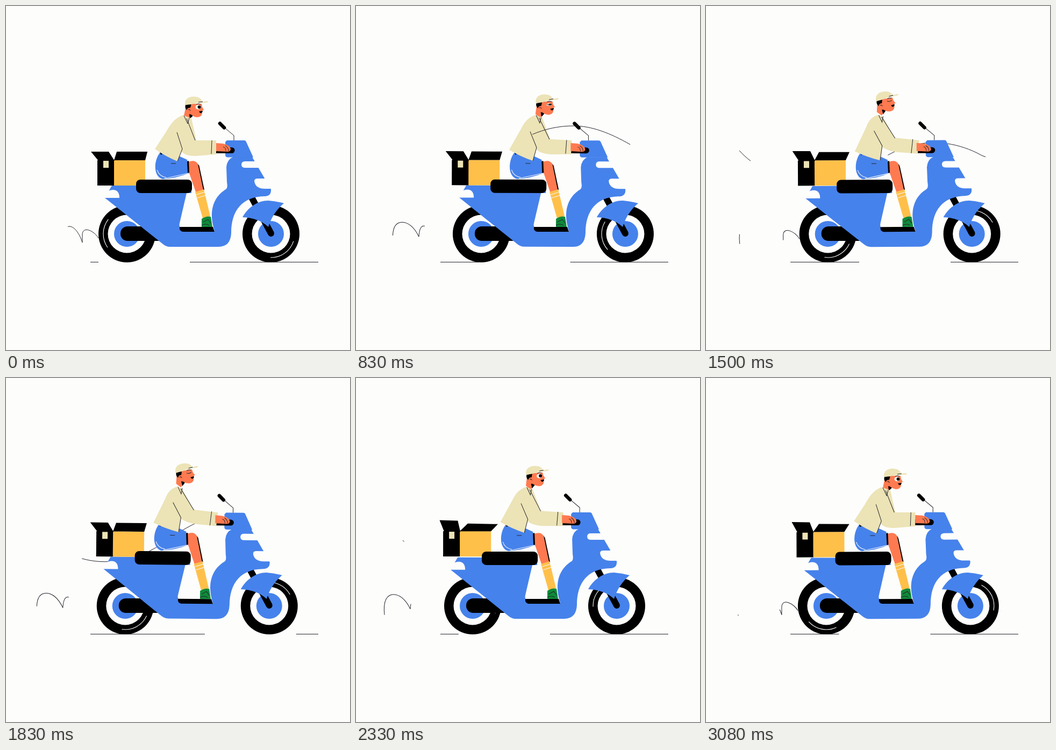
An HTML page that plays this animation: 640x640 px, repeating every 3160 ms.

```html
<!DOCTYPE html>
<html lang="en">
<head>
<meta charset="utf-8">
<title>Scooter ride</title>
<style>
  html, body { margin: 0; width: 100%; height: 100%; overflow: hidden; background: #fdfdfc; }
  svg { display: block; width: 100vw; height: 100vh; }
  .blue { fill: #4682eb; }
  .paper { fill: #fdfdfc; }
  .cream { fill: #ece3b6; }
  .skin { fill: #ff7a50; }
  .sun { fill: #ffc04a; }
  .thin { fill: none; stroke: #26262c; stroke-width: 1; }
  .light { fill: none; stroke: #eef2fa; stroke-width: 1.1; }
  .bar { fill: none; stroke: #000; stroke-linecap: round; }
  .shine { fill: none; stroke: #fff; stroke-width: 1.1; stroke-dasharray: 56 300; }
</style>
</head>
<body>
<svg viewBox="0 0 640 640">
  <path id="ground" class="thin" d="M157 476.5H581" stroke-dasharray="254 170"/>
  <path id="smoke" class="thin" pathLength="1" d="M172 432C165 419 143 408 142 425L142 440C138 426 128 410 118 410Q110 410 109 430C100 411 88 403 78 403C66 403 58 414 61 441"/>
  <path id="windBack" class="thin" pathLength="1" d="M580 318C555 298 535 286 513 278C470 254 425 250 390 258C330 270 300 310 250 330C200 348 130 350 87 302"/>

  <g id="wheels">
    <g transform="translate(225 424)">
      <circle r="53"/><circle r="35.5" class="paper"/><circle r="24" class="blue"/>
      <circle id="rearShine" r="44" class="shine"/>
      <rect x="-12" y="-14" width="84" height="27" rx="13"/>
    </g>
    <g transform="translate(493 424)">
      <circle r="53"/><circle r="35.5" class="paper"/><circle r="24" class="blue"/>
      <circle id="frontShine" r="44" class="shine"/>
    </g>
    <path class="bar" stroke-width="12" d="M458 358L493 423"/>
    <path class="blue" d="M440 393C450 375 468 362 488 362Q502 363 517 367C503 379 494 393 488 411C475 399 460 394 440 393Z"/>
  </g>

  <g id="bike">
    <path class="blue" d="M184 357L197 334H345V348H336L323 404Q321 412 328 415L388 419Q382 400 383 385C385 360 398 348 409 341Q413 338 411 328L410 300Q411 286 422 281H458L493 341Q494 354 480 354C440 355 419 380 419 422Q418 448 395 448H305Q298 448 292 443Z"/>
    <path d="M323 411H385L388 420H329Q322 419 323 411Z"/>
    <path class="paper" d="M183 357Q185 342 200 342Q211 343 211 357Z"/>
    <path class="paper" d="M445 289H463L471 301H445Q438 301 438 295Q438 289 445 289ZM468 321H483L495 340H482Q464 340 462 326Q462 321 468 321Z"/>

    <path class="thin" d="M424 250V241L405 225"/>
    <path class="bar" stroke-width="6.5" d="M398 218.500L406 226.500"/>
    <path class="blue" d="M411 250H443Q446 250 447 253L460 281.500H412Q408 281 408 277V253Z"/>
    <path class="bar" stroke-width="11" d="M388 268.500H420"/>

    <g id="box">
      <path d="M170 287H202V334H170Z"/>
      <path class="sun" d="M201 287H259V334H201Z"/>
      <path class="cream" d="M181 288H191V301H181Z"/>
      <path id="flaps"/>
    </g>

    <!-- legs -->
    <path d="M350 292Q359 292 360 300L369 342L362 344Z"/>
    <path class="skin" d="M339 290Q352 285 357 294L367 342L353 346L341 311Z"/>
    <path class="sun" d="M352 346L368 341L380 391L366 395Z"/>
    <path class="light" d="M354 351L370 346M356 357L372 352"/>
    <path fill="#0f8a3a" d="M364 396Q373 390 381 392L384 411H364Z"/>
    <path class="thin" d="M367 402L376 397L381 404M364 408Q372 404 378 408"/>
    <path class="blue" d="M287 272C274 288 274 317 291 322Q315 321 341 311L337 286L315 276Z"/>
    <path d="M337 289L340 288L341 310L338 311Z"/>
    <path class="light" d="M281 305Q285 317 298 319M295 321L340 311"/>
    <path class="thin" d="M307 293H316"/>
    <path d="M286 270L293 274L288 277Z"/>
    <rect x="242" y="323" width="104" height="25" rx="8"/>

    <!-- rider -->
    <g id="head">
      <path class="skin" d="M334 190L331 204L339 212L347 203V194Z"/>
      <path d="M341 201L349 203L342 210Z"/>
      <path class="skin" d="M341 182H364L365 188L368 193L365 195Q366 207 355 207Q343 205 341 195Z"/>
      <path d="M334 184Q332 190 337 194L343 189L345 182Z"/>
      <circle class="skin" cx="341" cy="194" r="4.5"/>
      <path class="thin" d="M339 193Q342 191 343 195M354 183Q358 181 362 183"/>
      <g id="eye">
        <ellipse cx="357.5" cy="188" rx="5" ry="4.2" fill="#fff"/>
        <circle cx="359.5" cy="188" r="3"/>
      </g>
      <path id="lid" class="thin" d="M353 187Q357 190 362 187"/>
      <path d="M359 196L366 195Q365 200 361 199Z"/>
      <path class="cream" d="M333 184Q332 169 349 168.500Q363 169 365 178L375 177Q377 179 373 180Q352 180 345 183Z"/>
      <path class="thin" d="M358 179L366 178"/>
    </g>
    <path id="shirt" class="cream"/>
    <path id="folds" class="thin"/>
    <path class="skin" d="M391 255L404 256Q417 259 418 266Q418 271 412 271L391 270Z"/>
    <path class="thin" d="M404 262Q409 263 409 270M408 260Q414 263 414 270"/>
  </g>
  <path id="windFront" class="thin" pathLength="1" d="M589 310C520 260 460 223 405 223C310 223 260 290 200 310C140 325 95 305 62 269"/>
</svg>
<script>
const LOOP = 3160, STEPS = 38, BEATS = 90;
const $ = id => document.getElementById(id);
const set = (id, name, value) => $(id).setAttribute(name, value);
const clamp = x => Math.min(1, Math.max(0, x));
const wave = (cycles, beat, peak) => Math.cos(2 * Math.PI * (cycles * beat / BEATS - peak));

// Piecewise linear curve through [x, y] points.
function curve(x, points) {
  for (let i = 1; i < points.length; i++) {
    const [x0, y0] = points[i - 1], [x1, y1] = points[i];
    if (x <= x1) return y0 + (y1 - y0) * clamp((x - x0) / (x1 - x0));
  }
  return points[points.length - 1][1];
}

// Blend two paths that share the same commands.
function blend(a, b, u) {
  const ends = b.match(/[\d.]+/g);
  let i = 0;
  return a.replace(/[\d.]+/g, n => (+n + (ends[i++] - n) * u).toFixed(2));
}

function trim(id, tail, head) {
  const from = clamp(tail), length = Math.max(0, clamp(head) - from);
  set(id, 'stroke-dasharray', `0 ${from} ${length} 3`);
  set(id, 'visibility', length > 0 ? 'visible' : 'hidden');
}

// Picture steps to whole beats; every motion below runs on beats.
const TEMPO = [[0, 0], [4, 7], [10, 21], [18, 42], [22, 51], [28, 67], [37, 88], [38, 90]];
const BLINK = [[18, 1], [24, 0], [56, 0], [62, 1]];

const SHIRT = [
  'M329 203C312 209 304 224 298 234L277 266Q297 280 319 289L326 270Q333 279 352 279L391 276L391 250L354 250L345 209Z',
  'M320 202C305 207 301 216 298 224L276 270Q299 281 323 287L327 262Q338 270 357 272L393 275L396 250L350 245L329 207Z'];
const FOLDS = [
  'M331 204L338 219L341 208M336 209L352 250M318 235L328 266L319 289M383 250L382 275',
  'M321 203L327 216L329 205M326 206L351 246M312 232L327 260L323 287M384 248L381 274'];
const FLAPS = [
  'M158 271L191 271L202 288L172 288ZM206 271L263 271L259 287L201 287Z',
  'M164 266L198 267L202 288L172 288ZM217 273L273 274L259 287L201 287Z'];

function draw(beat) {
  const dx = 8 * wave(1, beat, .25), tilt = .76 * wave(2, beat, .25);
  const ride = `translate(${dx} 0) rotate(${tilt} 360 430)`;
  set('bike', 'transform', ride);
  set('smoke', 'transform', ride);
  set('wheels', 'transform', `translate(${dx} 0)`);

  // Eight ground lengths and ten wheel turns per loop.
  set('ground', 'stroke-dashoffset', beat * 8 * 424 / BEATS - 185);
  const turn = beat * 3600 / BEATS;
  set('rearShine', 'transform', `rotate(${turn + 145})`);
  set('frontShine', 'transform', `rotate(${turn + 18})`);

  const hop = .6 * (1 + wave(9, beat, .53));
  set('box', 'transform', `translate(0 ${-2 * hop})`);
  set('flaps', 'd', blend(...FLAPS, hop));

  // The rider sits up and leans back down once per loop.
  const c = (1 - wave(1, beat, 0)) / 2, sit = c * c * (3 - 2 * c);
  set('shirt', 'd', blend(...SHIRT, sit));
  set('folds', 'd', blend(...FOLDS, sit));
  set('head', 'transform', `translate(${-16 * sit} ${-9 * sit}) rotate(${-9 * sit} 345 190)`);
  const open = curve(beat, BLINK);
  set('eye', 'transform', `translate(0 ${188 * (1 - open)}) scale(1 ${open})`);
  set('lid', 'visibility', open < .6 ? 'visible' : 'hidden');

  // A new puff starts while the end of the last one is still fading out.
  const puff = (beat + 6) % 15, head = .0775 * (puff + .1), tail = .0775 * (puff - 6.2);
  const rest = tail + 15 * .0775;
  if (rest < 1) set('smoke', 'stroke-dasharray', `${clamp(head)} ${rest - clamp(head)} ${1 - rest} 3`);
  else trim('smoke', tail, head);

  trim('windFront', (beat - 16.7) * .0376, (beat - 9.9) * .044);
  trim('windBack', (beat - 38.2) * .0345, (beat - 31) * .044);
}

const start = performance.now();
function tick() {
  const t = (performance.now() - start) % LOOP;
  const step = Math.floor(t * STEPS / LOOP + .06) % STEPS;
  draw(Math.round(curve(step, TEMPO)));
  requestAnimationFrame(tick);
}
tick();
</script>
</body>
</html>
```
